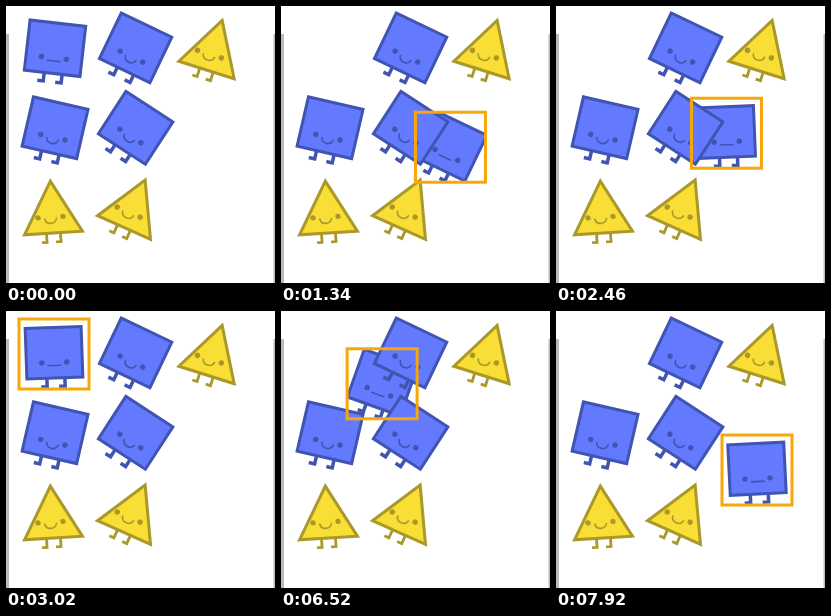
An HTML page with a canvas for the animation above (7.99 s loop, 269 px wide and 277 px high).

```html
<!DOCTYPE html>
<html>
<head>
<meta charset="utf-8">
<style>
  html, body { margin: 0; width: 100%; height: 100%; overflow: hidden; background: #fff; }
  canvas { display: block; }
</style>
</head>
<body>
<canvas id="stage" width="269" height="277"></canvas>
<script>
const ctx = document.getElementById('stage').getContext('2d');
const LOOP = 7990, START = 500, STEP = 70, SWING_STEP = STEP / 2;
const DEGREE = Math.PI / 180;
const BLUE = { fill: '#637aff', line: '#4054b2' };
const YELLOW = { fill: '#f9de35', line: '#ab982a' };

// Each phase: tilt at its start, and a smooth path through [time, x, y]
const phases = [
  { tilt: -2, path: [[500, 0, 0], [920, 40, 27], [1270, 116, 92], [1900, 129, 119], [2950, 117, 60]] },
  { tilt: -2, path: [[3020, 0, 0]] },
  { tilt: -17, path: [[6030, 0, -1], [6500, 50, 28], [6870, 124, 70], [7010, 131, 73], [7920, 153, 116]] }
];
const BOXED_AGAIN = 5960;

// Cubic Hermite curve, at rest at both ends
function along(path, t, axis) {
  const last = path.length - 1;
  if (t <= path[0][0]) return path[0][axis];
  if (t >= path[last][0]) return path[last][axis];
  const i = path.findIndex(p => p[0] > t) - 1;
  const slope = n => n === 0 || n === last ? 0 :
    (path[n + 1][axis] - path[n - 1][axis]) / (path[n + 1][0] - path[n - 1][0]);
  const a = path[i], b = path[i + 1], span = b[0] - a[0], s = (t - a[0]) / span;
  const ease = s * s * (3 - 2 * s);
  return a[axis] + (b[axis] - a[axis]) * ease +
    span * s * (1 - s) * ((1 - s) * slope(i) - s * slope(i + 1));
}

// The dragged square dangles: sideways speed tilts it, a damped spring pulls it back
function poseAt(t) {
  const phase = t >= BOXED_AGAIN ? phases[2] : t >= phases[1].path[0][0] ? phases[1] : phases[0];
  const { path } = phase;
  const end = Math.min(t, path[path.length - 1][0]);
  let tilt = phase.tilt * DEGREE, spin = 0;
  for (let now = path[0][0] + SWING_STEP; now <= end; now += SWING_STEP) {
    tilt += (along(path, now, 1) - along(path, now - SWING_STEP, 1)) / 100;
    spin = (spin - tilt * 0.02) * 0.9;
    tilt += spin;
  }
  return { dx: along(path, t, 1), dy: along(path, t, 2), tilt: tilt / DEGREE };
}

function place(x, y, degrees, paint) {
  ctx.save();
  ctx.translate(x, y);
  ctx.rotate(degrees * DEGREE);
  paint();
  ctx.restore();
}

function trace(width, points) {
  ctx.lineWidth = width;
  ctx.beginPath();
  points.forEach(([x, y]) => ctx.lineTo(x, y));
}

function body(color, outline) {
  ctx.fillStyle = color.fill;
  ctx.strokeStyle = color.line;
  trace(3, outline);
  ctx.closePath();
  ctx.fill();
  ctx.stroke();
  ctx.fillStyle = color.line;
}

function legs(positions, top, bottom, foot, width) {
  for (const x of positions) {
    trace(width, [[x, top], [x, bottom], [x - foot, bottom]]);
    ctx.stroke();
  }
}

function face(x, y, gap, happy) {
  for (const side of [-1, 1]) {
    ctx.beginPath();
    ctx.arc(x + side * gap, y, 2.7, 0, 7);
    ctx.fill();
  }
  ctx.lineWidth = 1.6;
  ctx.beginPath();
  if (happy) {
    ctx.moveTo(x - 6, y + 1);
    ctx.bezierCurveTo(x - 5, y + 8, x + 5, y + 8, x + 6, y + 1);
  } else {
    ctx.moveTo(x - 7, y + 3);
    ctx.lineTo(x + 7, y + 3);
  }
  ctx.stroke();
}

function square(x, y, degrees, happy = true) {
  place(x, y, degrees, () => {
    body(BLUE, [[-28, -25.5], [28, -25.5], [28, 25], [-28, 25]]);
    legs([-8, 10], 25, 33.5, 6, 3.5);
    face(0, 9.5, 12.5, happy);
  });
}

function triangle(x, y, degrees) {
  place(x, y, degrees, () => {
    body(YELLOW, [[0, -52], [29, 0], [-29, 0]]);
    legs([-7, 7], 0, 9, 5, 2.8);
    face(-2, -16, 12.5, true);
  });
}

function draw(time) {
  const t = time < START ? time : START + Math.floor((time - START) / STEP) * STEP;
  const boxed = t >= START;
  const { dx, dy, tilt } = poseAt(t);
  const box = [13 + dx, 8 + dy, 70, 70];

  ctx.fillStyle = '#fff';
  ctx.fillRect(0, 0, 269, 277);
  ctx.fillStyle = '#bbb';
  ctx.fillRect(0, 28, 3, 249);
  ctx.fillRect(267.5, 28, 1.5, 249);

  if (boxed) {
    ctx.save();
    ctx.beginPath();
    ctx.rect(...box);
    ctx.clip();
    square(48 + dx, 42 + dy, tilt, false);
    ctx.restore();
  } else {
    square(49, 42.5, 6.5, false);
  }

  square(129.5, 42, 25.6);
  triangle(200.5, 64, 17.5);
  square(49, 122, 13);
  square(129.5, 122, 33);
  triangle(47.5, 227, -3.5);
  triangle(118, 221.5, 24);

  if (boxed) {
    ctx.strokeStyle = '#f7a808';
    ctx.lineWidth = 3;
    ctx.strokeRect(...box);
  }
}

const begin = performance.now();
function tick() {
  draw((performance.now() - begin) % LOOP);
  requestAnimationFrame(tick);
}
tick();
</script>
</body>
</html>
```
